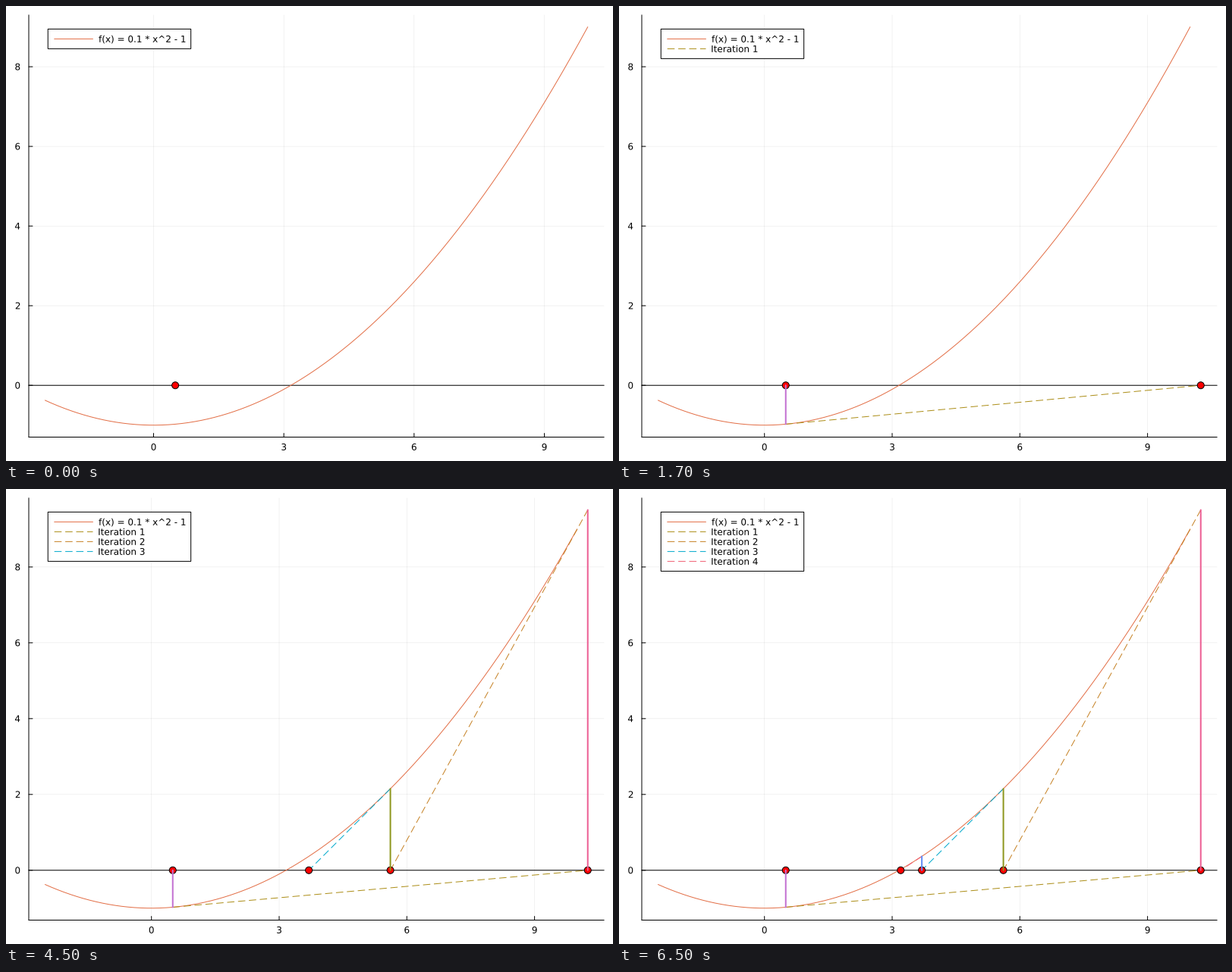
A matplotlib script for the animation above (8 s loop, 800 by 600 pixels).

```python
import numpy as np
import matplotlib.pyplot as plt
from matplotlib.animation import FuncAnimation
from matplotlib.patches import Circle, PathPatch, Rectangle
from matplotlib.textpath import TextPath
from matplotlib.transforms import Affine2D

plt.rcParams["font.family"] = "DejaVu Sans"

PX = 0.72  # points per pixel at 100 dpi
LEFT, RIGHT, TOP, BOTTOM = 30, 788.19, 11.81, 568.5
X_MIN, X_MAX, Y_MIN, Y_MAX = -2.5, 10, -1, 9
CURVE = "#e36f47"
DROPS = ["#c371d2", "#ed5e93", "#8e971e", "#618df6"]
TANGENTS = ["#ac8e18", "#c68225", "#00a9cc", "#f05f73"]
DASH = (0, (9.6, 4.8))
STEP_MS = 500


def f(x):
    return 0.1 * x**2 - 1


def newton(x, steps):
    """Return the start value and the given number of Newton iterates."""
    points = [x]
    for _ in range(steps):
        x -= f(x) / (0.2 * x)
        points.append(x)
    return points


ROOTS = newton(0.5, 4)

fig = plt.figure(figsize=(8, 6), dpi=100, facecolor="white")
ax = fig.add_axes([0, 0, 1, 1])


def axis_scale(low, high, start, end):
    """Map data to pixels with 3 % padding on both sides."""
    pad = 0.03 * (high - low)
    return lambda v: start + (v - low + pad) / (high - low + 2 * pad) * (end - start)


def line(x, y, color="black", width=1, dash="-", **kw):
    ax.plot(x, y, color=color, lw=width * PX, ls=dash, snap=False,
            solid_capstyle="round", dash_capstyle="butt", **kw)


def label(x, y, text, anchor=0.5):
    """Draw text with its ink anchored at x (0 left, 1 right), centred on y."""
    path = TextPath((0, 0), text, size=12)
    ink = path.get_extents()
    move = Affine2D().scale(1, -1).translate(x - ink.x0 - anchor * ink.width, y + 4.4)
    ax.add_patch(PathPatch(move.transform_path(path), fc="black", lw=0,
                           zorder=5, snap=False))


def marker(x, y):
    ax.add_patch(Circle((x, y), 4.5, fc="red", ec="black", lw=PX,
                        zorder=2, snap=False))


def draw_axes(sx, sy):
    grid = dict(width=0.5, alpha=0.1)
    for v in (0, 3, 6, 9):
        x = sx(v)
        line([x, x], [TOP, BOTTOM], **grid)
        line([x, x], [BOTTOM, BOTTOM - 5])
        label(x, 581.4, str(v))
    for v in (0, 2, 4, 6, 8):
        y = sy(v)
        line([LEFT, RIGHT], [y, y], **grid)
        line([LEFT, LEFT + 5], [y, y])
        label(18.3, y, str(v), anchor=1)
    line([LEFT, LEFT], [TOP, BOTTOM])
    line([LEFT, RIGHT], [BOTTOM, BOTTOM])


def draw_legend(count):
    ax.add_patch(Rectangle((55.27, 30.37), 188.4, 26 + 13 * count, fc="white",
                           ec="black", lw=PX, zorder=3, snap=False))
    entries = [("f(x) = 0.1 * x^2 - 1", CURVE, "-")]
    entries += [(f"Iteration {k + 1}", TANGENTS[k], DASH) for k in range(count)]
    for k, (text, color, dash) in enumerate(entries):
        y = 43.4 + 13 * k
        line([63.7, 114.5], [y, y], color, dash=dash, zorder=4)
        label(122.3, y, text, anchor=0)


def draw(i):
    count = (i + 3) // 4
    shown = ROOTS[:count + 1]
    peak = max([Y_MAX] + [f(x) for x in shown[:-1]])
    sx = axis_scale(X_MIN, max([X_MAX] + shown), LEFT, RIGHT)
    sy = axis_scale(Y_MIN, peak, BOTTOM, TOP)

    ax.clear()
    ax.set(xlim=(0, 800), ylim=(600, 0))
    ax.axis("off")
    draw_axes(sx, sy)

    zero = sy(0)
    line([LEFT, RIGHT], [zero, zero])
    xs = np.linspace(X_MIN, X_MAX, 251)
    line(sx(xs), sy(f(xs)), CURVE)
    marker(sx(shown[0]), zero)
    for k, (a, b) in enumerate(zip(shown, shown[1:])):
        xa, xb, ya = sx(a), sx(b), sy(f(a))
        line([xa, xa], [zero, ya], DROPS[k], width=2, zorder=2.2)
        line([xa, xb], [ya, zero], TANGENTS[k], dash=DASH)
        marker(xb, zero)
    draw_legend(count)
    return ax.get_children()


# The start pose lasts one step, then each iteration lasts four.
anim = FuncAnimation(fig, draw, frames=16, init_func=lambda: [],
                     interval=STEP_MS, repeat=True, repeat_delay=0)
plt.show()
```
